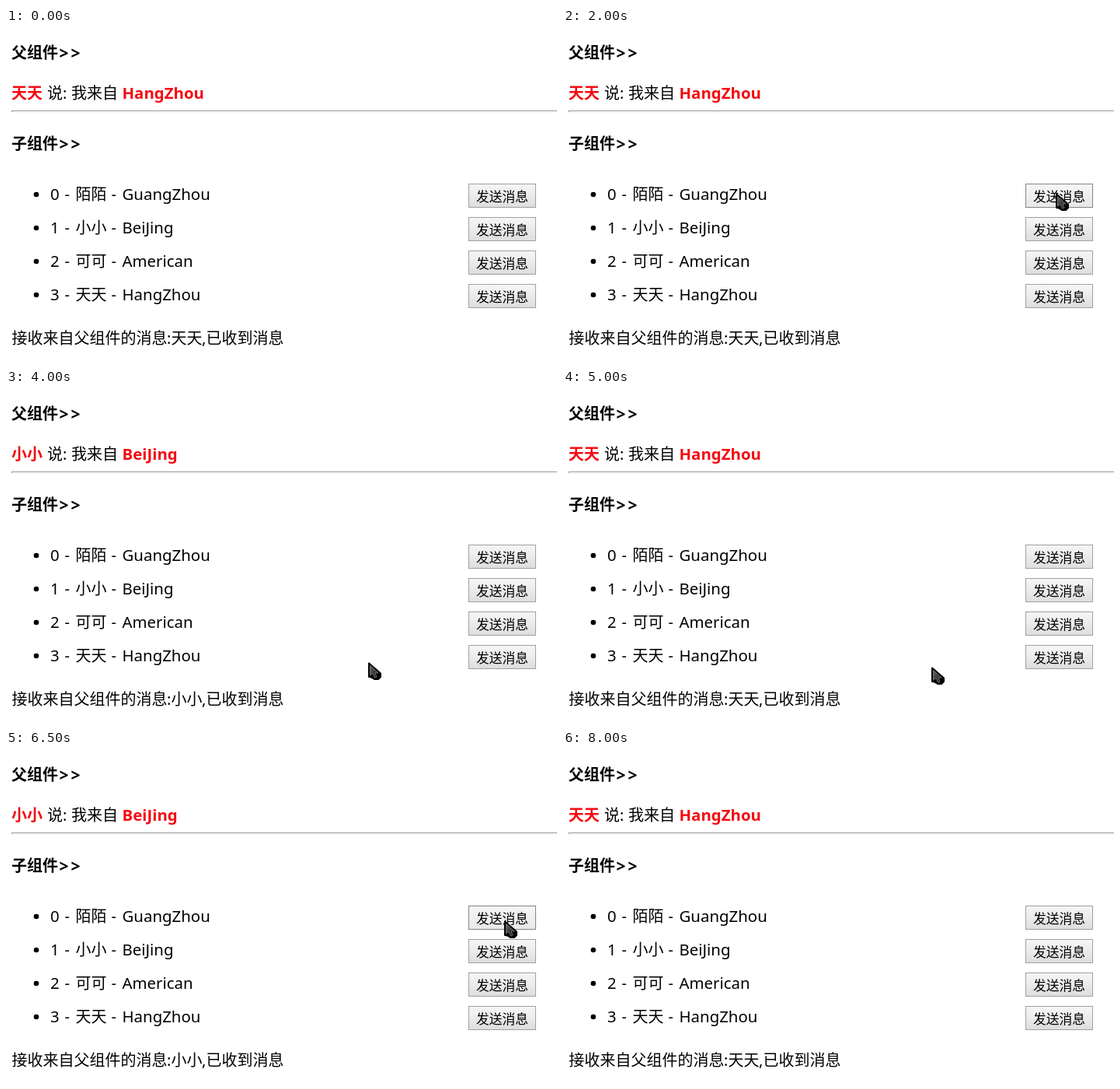
Animation of 709x428 px, one loop 8750 ms. Source, as an HTML page:

```html
<!DOCTYPE html>
<html lang="zh-CN">
<head>
<meta charset="utf-8">
<style>
html, body { margin: 0; width: 100%; height: 100%; overflow: hidden; background: #fff; }
svg { display: block; }
text { font: 350 20px "Noto Sans", "Noto Sans CJK SC", "Noto Sans CJK", sans-serif; fill: #000; }
.latin { font-size: 20.4px; font-weight: 400; }
.bold { font-weight: 700; }
.red { fill: #f40b12; }
.arrows { font-size: 21px; }
.label { font-size: 16.8px; }
.button { fill: url(#face); stroke: #a0a0a0; }
.button.hover { fill: url(#hoverFace); stroke: #858585; }
</style>
</head>
<body>
<svg width="709" height="428" viewBox="0 0 709 428">
  <defs>
    <linearGradient id="face" x2="0" y2="1">
      <stop offset="0" stop-color="#f5f5f5"/><stop offset=".35" stop-color="#efefef"/><stop offset="1" stop-color="#ddd"/>
    </linearGradient>
    <linearGradient id="hoverFace" x2="0" y2="1">
      <stop offset="0" stop-color="#f6f6f6"/><stop offset="1" stop-color="#e8e8e8"/>
    </linearGradient>
    <linearGradient id="arrowFill" x2="1" y2="1">
      <stop offset="0" stop-color="#666"/><stop offset="1" stop-color="#111"/>
    </linearGradient>
  </defs>
  <path d="M7 106.5H709M7.5 106V108" stroke="#9a9a9a"/>
  <path d="M8 108.5H709" stroke="#eee"/>
  <g id="page"></g>
  <g id="cursor" stroke-linejoin="round">
    <path d="M1 1.5V19L4 19.5L8 22H13L16 19V14.5Z" stroke="#000" stroke-width="2"/>
    <path d="M2.5 4.5V17L5.8 14.5L8.5 20L11 19L9 14H13Z" fill="url(#arrowFill)" stroke="#888" stroke-width=".8"/>
  </g>
</svg>
<script>
const LOOP = 8750, STEP = 250, SHOW = 1000, HIDE = 8000;
const ROW = 43, BUTTON = { x: 595, y: 200, width: 87, height: 31 };
const people = [
  ['陌陌', 'GuangZhou'], ['小小', 'BeiJing'], ['可可', 'American'], ['天天', 'HangZhou']
];
const page = document.getElementById('page');
const cursor = document.getElementById('cursor');

function add(tag, attrs, content = '') {
  const node = document.createElementNS('http://www.w3.org/2000/svg', tag);
  for (const key in attrs) node.setAttribute(key, attrs[key]);
  node.textContent = content;
  return page.appendChild(node);
}
const write = (x, y, content, style = '') => add('text', { x, y, class: style }, content);

function heading(y, content) {
  write(7, y, content, 'bold');
  write('68.5 83.5', y + .5, '>>', 'bold arrows');
}

heading(39, '父组件');
heading(156, '子组件');

const speaker = write(7, 91, '', 'bold red');
write(53, 91, '说:');
write(84, 91, '我来自');
const city = write(149.5, 91, '', 'latin bold red');

const buttons = people.map(([name, place], i) => {
  const y = 221 + ROW * i;
  add('circle', { cx: 39, cy: y - 7, r: 3.3 });
  write(57, y, i, 'latin');
  write(75.5, y, '-');
  write(89.5, y, name);
  write(135.5, y, '-');
  write(149.5, y, place, 'latin');
  const button = add('rect', {
    x: BUTTON.x + .5, y: BUTTON.y + ROW * i + .5, width: BUTTON.width - 1, height: BUTTON.height - 1
  });
  write(605, y + 1.5, '发送消息', 'label');
  return button;
});

write(7.5, 406, '接收来自父组件的消息');
write(207, 406, ':');
const receiver = write(212.5, 406, '');
write(252, 406, ',');
write(257.5, 406, '已收到消息');

// Where the pointer arrives; it rests there for one step, and a rest on a button is a click.
const stops = [
  [750, 329, 360], [2000, 634, 212], [2750, 467, 249], [3500, 636, 257], [4000, 466, 351],
  [4500, 638, 343], [5000, 474, 357], [5250, 637, 299], [6000, 638, 256], [6500, 641, 219],
  [7000, 638, 343], [7750, 600, 17]
].map(([time, x, y]) => ({ time, x, y }));

const rowAt = ({ x, y }) => buttons.findIndex((_, i) => {
  const dx = x - BUTTON.x, dy = y - BUTTON.y - ROW * i;
  return dx >= 0 && dx <= BUTTON.width && dy >= 0 && dy <= BUTTON.height;
});
const easeOut = p => 1 - (1 - p) ** 2;

function pointerAt(time) {
  const next = stops.findIndex(stop => stop.time > time);
  if (next < 0) return stops.at(-1);
  const from = stops[Math.max(next - 1, 0)], to = stops[next];
  const leave = from.time + STEP;
  if (time <= leave) return from;
  const p = easeOut((time - leave) / (to.time - leave));
  return { x: from.x + (to.x - from.x) * p, y: from.y + (to.y - from.y) * p };
}

function chosenAt(time) {
  const click = stops.findLast(stop => rowAt(stop) >= 0 && stop.time + STEP <= time);
  return click ? rowAt(click) : people.length - 1;
}

function draw(time) {
  const [name, place] = people[chosenAt(time)];
  speaker.textContent = receiver.textContent = name;
  city.textContent = place;

  const visible = time >= SHOW && time < HIDE;
  const pointer = pointerAt(time);
  cursor.setAttribute('visibility', visible ? 'visible' : 'hidden');
  cursor.setAttribute('transform', `translate(${pointer.x} ${pointer.y})`);
  const hovered = visible ? rowAt(pointer) : -1;
  buttons.forEach((button, i) => button.setAttribute('class', i === hovered ? 'button hover' : 'button'));
}

function tick() {
  const time = performance.now() % LOOP;
  draw(Math.floor(time / STEP) * STEP);
  requestAnimationFrame(tick);
}
tick();
</script>
</body>
</html>
```
